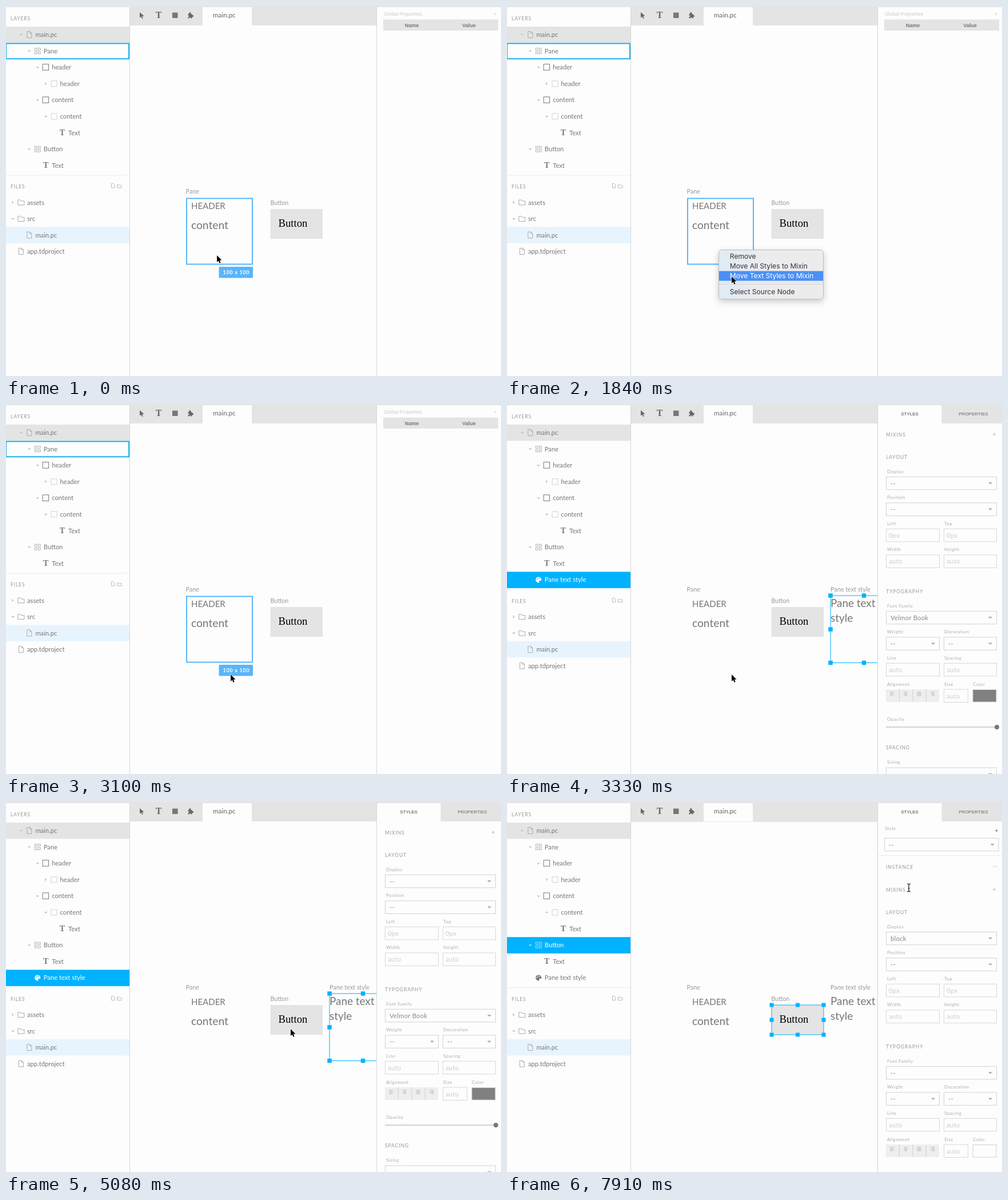
Write an HTML page that moves like this. It is 866 px wide and 647 px high and loops after 8 s.

```html
<!DOCTYPE html>
<html lang="en">
<head>
<meta charset="utf-8">
<title>Style editor</title>
<style>
  html, body { margin: 0; width: 100%; height: 100%; overflow: hidden; background: #fdfdfd; }
  svg { display: block; width: 866px; height: 647px; }
  text { font-family: Lato, "Open Sans", sans-serif; white-space: pre; }
  .ui { font-family: "Liberation Sans", Arial, sans-serif; }
  .menu { font-family: Inter, "Noto Sans", sans-serif; }
  .serif { font-family: "Liberation Serif", Times, serif; }
  .bold { font-weight: 700; }
  .caps { letter-spacing: .9px; }
  .label { letter-spacing: .55px; }
  .value { letter-spacing: .3px; }
  .badge { font-weight: 700; letter-spacing: .7px; }
  .mid { text-anchor: middle; }
  #menuBox { filter: drop-shadow(0 4px 6px rgba(0, 0, 0, .2)); }
</style>
</head>
<body>
<svg id="stage" viewBox="0 0 866 647" xmlns="http://www.w3.org/2000/svg"></svg>
<script>
const BG = '#fdfdfd', GREY = '#e4e4e4', INK = '#777', BLUE = '#00b2ff', HOVER = '#58b5fa';
const LOOP = 8000, CREATED = 3330, PICKED = 6700;
const ROW = 28.6;

// Drawing helpers; text is placed by its left edge and middle height.
const rect = (x, y, w, h, fill, more = '') =>
  `<rect x="${x}" y="${y}" width="${w}" height="${h}" fill="${fill}" ${more}/>`;
const box = (x, y, w, h, stroke, width = 1) =>
  rect(x, y, w, h, 'none', `stroke="${stroke}" stroke-width="${width}"`);
const path = (d, fill, stroke = 'none', more = '') =>
  `<path d="${d}" fill="${fill}" stroke="${stroke}" ${more}/>`;
const dot = (x, y, r, fill) => `<circle cx="${x}" cy="${y}" r="${r}" fill="${fill}"/>`;
const text = (x, y, s, size, fill = INK, cls = '') =>
  `<text x="${x}" y="${(y + size * .36).toFixed(2)}" font-size="${size}" fill="${fill}" class="${cls}">${s}</text>`;
const group = (id, body, more = '') => `<g id="${id}" ${more}>${body}</g>`;
const caps = (x, y, s) => text(x, y, s, 8.5, '#999', 'caps');
const label = (x, y, s) => text(x, y, s, 7.8, '#aaa', 'label');
const plus = (x, y, c) => path(`M${x - 2.5} ${y}h5M${x} ${y - 2.5}v5`, 'none', c);

const caretDown = (x, y, c = '#c6c6c6', w = 3) =>
  path(`M${x - w} ${y - w / 2}h${2 * w}l${-w} ${w}z`, c);
const caretRight = (x, y, c = '#c6c6c6') => path(`M${x - 1.5} ${y - 3}v6l3 -3z`, c);

const icons = {
  file: (x, y, c = '#aaa') =>
    path(`M${x - 4} ${y - 5.5}h5l3 3v8h-8zM${x + 1} ${y - 5.5}v3h3`, 'none', c),
  folder: (x, y, c = '#aaa') =>
    path(`M${x - 5.5} ${y + 4.5}v-9h4l1.5 2h5.5v7z`, 'none', c, 'stroke-linejoin="round"'),
  component: (x, y, c = '#b5b5b5') =>
    box(x - 5, y - 5, 3.8, 3.8, c) + box(x + 1.2, y - 5, 3.8, 3.8, c) +
    box(x - 5, y + 1.2, 3.8, 3.8, c) + box(x + 1.2, y + 1.2, 3.8, 3.8, c),
  frame: (x, y) => box(x - 5.5, y - 5.5, 10.5, 10.5, '#777'),
  slot: (x, y) => box(x - 5, y - 5, 10, 10, '#d2d2d2'),
  type: (x, y) => text(x, y - .4, 'T', 14, INK, 'serif bold mid'),
  palette: (x, y, c = INK, hole = BG) =>
    dot(x, y, 5, c) + dot(x - 2.6, y - .4, .9, hole) + dot(x - 1, y - 2.7, .9, hole) +
    dot(x + 1.7, y - 2.5, .9, hole) + dot(x + 2.8, y + 3, 1.9, hole)
};

// One tree line: depth sets the indent, caret is 'd', 'r' or ''.
function treeRow(y, depth, caret, icon, name, color = INK, iconColor, hole) {
  const x = 12 + depth * 14.4;
  const c = color === INK ? undefined : '#a5dcf8';
  return (caret === 'd' ? caretDown(x, y + .5, c) : caret === 'r' ? caretRight(x, y, c) : '') +
    icons[icon](x + 14.4, y, iconColor, hole) + text(x + 25, y, name, 11.2, color);
}

const layerY = i => 50 + i * ROW;
const layers = [
  [1, 'd', 'file', 'main.pc'], [2, 'd', 'component', 'Pane'],
  [3, 'd', 'frame', 'header'], [4, 'r', 'slot', 'header'],
  [3, 'd', 'frame', 'content'], [4, 'd', 'slot', 'content'],
  [5, '', 'type', 'Text'], [2, 'd', 'component', 'Button'], [3, '', 'type', 'Text']
];
const selectedRow = (i, ...row) =>
  rect(0, 36 + i * ROW, 216, ROW, BLUE) + treeRow(layerY(i), ...row);

const sidebar = () =>
  caps(8, 22, 'LAYERS') + rect(0, 36, 216, 28.4, GREY) +
  layers.map((row, i) => treeRow(layerY(i), ...row)).join('') +
  group('paneRow', box(0, 65.5, 215, 26.8, '#1eaeea', 2)) +
  group('styleRow', treeRow(layerY(9), 2, '', 'palette', 'Pane text style')
    .replace(/^/, '')) +
  group('styleSelected', selectedRow(9, 2, '', 'palette', 'Pane text style', '#fff', '#fff', BLUE)) +
  group('buttonSelected', selectedRow(7, 2, 'd', 'component', 'Button', '#fff', '#a5dcf8')) +
  group('files',
    rect(0, 295.5, 216, 1, '#ececec') + caps(8, 316, 'FILES') +
    path('M184.5 310.500h3l2 2v5.500h-5z', 'none', '#bbb') +
    path('M194.500 318v-5.500h3l1 1.200h3.500v4.300z', 'none', '#bbb') +
    rect(0, 386.3, 216, 28.5, '#e8f4fd') +
    treeRow(343.5, 0, 'r', 'folder', 'assets') + treeRow(372, 0, 'd', 'folder', 'src') +
    treeRow(400.5, 1, '', 'file', 'main.pc') + treeRow(429, 0, '', 'file', 'app.tdproject'));

const toolbar = () =>
  rect(217, 2, 431, 32, GREY) + rect(344, 2, 86, 32, BG) +
  path('M234 11v9.500l2.400-2 1.700 3.700 1.700-.8-1.700-3.500 3.400-.3z', '#666') +
  text(267, 15.7, 'T', 16, '#666', 'serif bold mid') + rect(291, 11.500, 9.500, 9.500, INK) +
  rect(318.5, 14, 7, 7.5, '#666') + dot(321.8, 12.8, 1.8, '#666') +
  dot(326.3, 17.5, 1.7, '#666') + dot(319, 17.8, 1.3, GREY) + dot(322, 21.300, 1.2, GREY) +
  text(362, 16, 'main.pc', 11.7, '#666');

const handles = (xs, ys, size) => xs.flatMap((x, i) => ys.map((y, j) =>
  i === 1 && j === 1 ? '' : rect(x - size / 2, y - size / 2, size, size, BLUE))).join('');

const canvas = () =>
  text(314.5, 324, 'Pane', 10.8, '#999') +
  text(324, 350, 'HEADER', 15) + text(324, 383.5, 'content', 19.2) +
  group('paneHover', box(316, 336.5, 115, 115, HOVER, 2) +
    rect(372.5, 456, 59.5, 19.5, HOVER, 'rx="1"') +
    text(379.5, 465.5, '100 x 100', 9, '#fff', 'badge')) +
  text(462.5, 344.5, 'Button', 10.6, '#999') + rect(462.5, 355, 91.5, 52, GREY) +
  text(476.5, 379.5, 'Button', 18.7, '#000', 'serif') +
  group('styleText', text(566, 324, 'Pane text style', 10.8, '#999') +
    text(566, 348, 'Pane text', 18.9) + text(566, 374, 'style', 18.9)) +
  group('styleFrame', box(566, 335, 117.5, 117.5, BLUE) +
    handles([566, 624.5, 683], [335, 394, 452.5], 7.5)) +
  group('buttonFrame', box(463, 355, 91, 52, BLUE) +
    handles([463, 508.5, 554], [355, 381, 407], 7)) +
  group('edge', path('M217 34.500h431V647', 'none', '#dfeaf2'));

const field = (x, y, w, s = '') =>
  box(x + .5, y, w - 1, 22.5, '#d8d8d8') + text(x + 5, y + 11.5, s, 11.2, '#ccc', 'value');
const select = (x, y, w, s = '--') =>
  box(x + .5, y, w - 1, 22.5, '#d2d2d2') + text(x + 8, y + 11.5, s, 11.2, '#888', 'value') +
  caretDown(x + w - 11.5, y + 11.5, '#aaa', 3.5);
const pair = (y, left, right, control, s) =>
  label(665, y, left) + label(765, y, right) + control(663, y + 9.300, 94, s) + control(764, y + 9.300, 93, s);

function alignButtons(y) {
  const cells = [0, 1, 2, 3].map(i => {
    const x = 674 + i * 23.5;
    const lines = [7, 4, 7, 4].map((w, k) => {
      const left = i === 0 ? x - 3.5 : i === 3 ? x + 3.500 - w : x - (i === 2 ? 3.5 : w / 2);
      return rect(left, y + 4.500 + k * 2, i === 2 ? 7 : w, 1, '#bbb');
    }).join('');
    return (i ? rect(x - 11.700, y, 1, 22, '#d0d0d0') : '') + lines;
  });
  return rect(663, y, 93, 22, '#eee') + cells.join('');
}

function styleForm(display, font, color) {
  return caps(663, 53.5, 'MIXINS') + plus(852.5, 53, '#bbb') + caps(663, 93, 'LAYOUT') +
    label(665, 118, 'Display') + select(663, 127.3, 194, display) +
    label(665, 163.5, 'Position') + select(663, 172.8, 194) +
    pair(209, 'Left', 'Top', field, '0px') + pair(254.6, 'Width', 'Height', field, 'auto') +
    caps(663, 328, 'TYPOGRAPHY') +
    label(665, 353, 'Font Family') + select(663, 362.3, 194, font) +
    pair(398.500, 'Weight', 'Decoration', select) + pair(444, 'Line', 'Spacing', field, 'auto') +
    label(665, 490, 'Alignment') + label(765, 490, 'Size') + label(815, 490, 'Color') +
    alignButtons(499) + field(764, 499, 43, 'auto') +
    rect(815, 499.5, 41, 21.5, color, 'stroke="#d2d2d2"') +
    label(665, 551, 'Opacity') + rect(663, 563.5, 194, 3, '#dcdcdc') + dot(857, 565, 4, INK) +
    caps(663, 601, 'SPACING') + label(665, 626.5, 'Sizing') + select(663, 636, 194);
}

const panel = () =>
  rect(648, 2, 218, 645, BG) + rect(648, 2, 1, 645, '#d8d8d8') +
  group('globals', text(661, 14, 'Global Properties', 8.7, '#ccc', 'ui') + plus(856, 14, '#ddd') +
    rect(660, 23.500, 201, 19.5, GREY) + text(710, 33.5, 'Name', 9, INK, 'ui bold mid') +
    text(810, 33.5, 'Value', 9, INK, 'ui bold mid')) +
  group('tabs', rect(760.5, 2, 105.5, 32, GREY) + text(704.5, 17.5, 'STYLES', 8, '#444', 'ui mid') +
    text(816, 17.5, 'PROPERTIES', 8, '#666', 'ui mid')) +
  group('styleForm', styleForm('--', 'Velmor Book', '#808080')) +
  group('buttonForm', label(661, 46.5, 'Style') + plus(856.5, 50, INK) + select(660, 63.3, 200.5) +
    rect(649, 93, 217, 1, '#ececec') + caps(663, 113.5, 'INSTANCE') +
    path('M852.500 111l-2 2 2 2M855 111l2 2-2 2', 'none', '#ccc') +
    group('shifted', styleForm('block', '--', BG), 'transform="translate(0 100)"'));

const items = [[438, 'Remove'], [455, 'Move All Styles to Mixin'],
  [472, 'Move Text Styles to Mixin'], [499.5, 'Select Source Node']];
const menu = () => group('menu',
  rect(370.5, 426.5, 183, 86, 'url(#glass)', 'id="menuBox" rx="5" stroke="#bdbdbd"') +
  rect(371, 486, 182, 1, '#d2d4d6') +
  `<rect id="mark" x="371" width="182" height="17" fill="#4a90f7"/>` +
  items.map(([y, s]) => text(389.8, y, s, 12.1, '#333', 'menu item')).join(''));

const pointer = () => group('pointer',
  group('arrow', path('M0 0V12l2.700-2.500 1.900 4.200 2-.9-1.900-4.100 3.800-.2z', '#000', '#fff',
    'stroke-width="1.200" paint-order="stroke"')) +
  group('beam', path('M-3-7q3 0 3 2.500v9q0 2.500 3 2.500M3-7q-3 0-3 2.500v9q0 2.500-3 2.500M-1.500 1h3',
    'none', '#111', 'stroke-width="1.200"')));

const stage = document.getElementById('stage');
stage.innerHTML =
  `<defs><linearGradient id="glass"><stop offset="0" stop-color="#e0ebf3"/>
   <stop offset=".45" stop-color="#ececee"/><stop offset="1" stop-color="#ececec"/></linearGradient></defs>` +
  rect(0, 0, 866, 647, BG) + canvas() + rect(0, 2, 217, 645, BG) + sidebar() +
  rect(216, 2, 1, 645, '#d8d8d8') + toolbar() + panel() + rect(0, 0, 866, 2, GREY) + menu() + pointer();

const $ = id => document.getElementById(id);
const menuTexts = [...stage.querySelectorAll('.item')];

// Pointer stops: time, x, y. Each holds until the next.
const stops = [
  [0, 369, 436], [450, 369, 434], [600, 369, 431.500],
  [1310, 370, 432], [1400, 374, 436], [1490, 379, 443], [1580, 384, 452],
  [1660, 389, 462], [1750, 392, 470], [1840, 393, 473],
  [3450, 401, 457], [3600, 425, 442], [3690, 470, 418], [3780, 525, 396],
  [3870, 590, 380], [3950, 635, 373], [4040, 651, 371], [4130, 646, 371],
  [4220, 630, 372], [4300, 612, 373], [4390, 598, 375],
  [4480, 578, 381], [4570, 555, 389], [4650, 534, 396], [4740, 515, 401],
  [4820, 504, 403], [4910, 501, 400], [5080, 498, 397],
  [5260, 495, 388], [5430, 489, 371], [5610, 483, 354], [5790, 480, 346],
  [6230, 482, 343], [6320, 484, 340], [6430, 486, 338],
  [6700, 484, 343], [6930, 483, 343], [7830, 570, 283], [7910, 703, 150]
];

// Visible span of each part.
const spans = {
  paneRow: [0, CREATED], paneHover: [0, CREATED], globals: [0, CREATED],
  styleText: [CREATED, LOOP], tabs: [CREATED, LOOP], styleRow: [PICKED, LOOP],
  styleSelected: [CREATED, PICKED], styleFrame: [CREATED, PICKED], styleForm: [CREATED, PICKED],
  buttonSelected: [PICKED, LOOP], buttonFrame: [PICKED, LOOP], buttonForm: [PICKED, LOOP],
  edge: [5790, LOOP], menu: [1050, 3100], arrow: [0, 7910], beam: [7910, LOOP]
};

function draw(t) {
  for (const [id, [from, to]] of Object.entries(spans))
    $(id).style.display = t >= from && t < to ? '' : 'none';
  $('files').setAttribute('transform', `translate(0 ${t < CREATED ? 0 : ROW})`);

  const [, x, y] = stops.findLast(s => s[0] <= t);
  $('pointer').setAttribute('transform', `translate(${x} ${y})`);

  const blink = t >= 2740 && t < 2830;
  const active = x > 371 && !blink ? Math.floor((y - 429.5) / 17) : -1;
  $('mark').setAttribute('y', 429.5 + active * 17);
  $('mark').style.display = active < 0 ? 'none' : '';
  menuTexts.forEach((el, i) => el.setAttribute('fill', i === active ? '#fff' : '#333'));
  $('menu').style.opacity = t < 2920 ? 1 : t < 3010 ? .65 : .25;
}

const start = performance.now();
function tick() {
  draw((performance.now() - start) % LOOP);
  requestAnimationFrame(tick);
}
tick();
</script>
</body>
</html>
```
